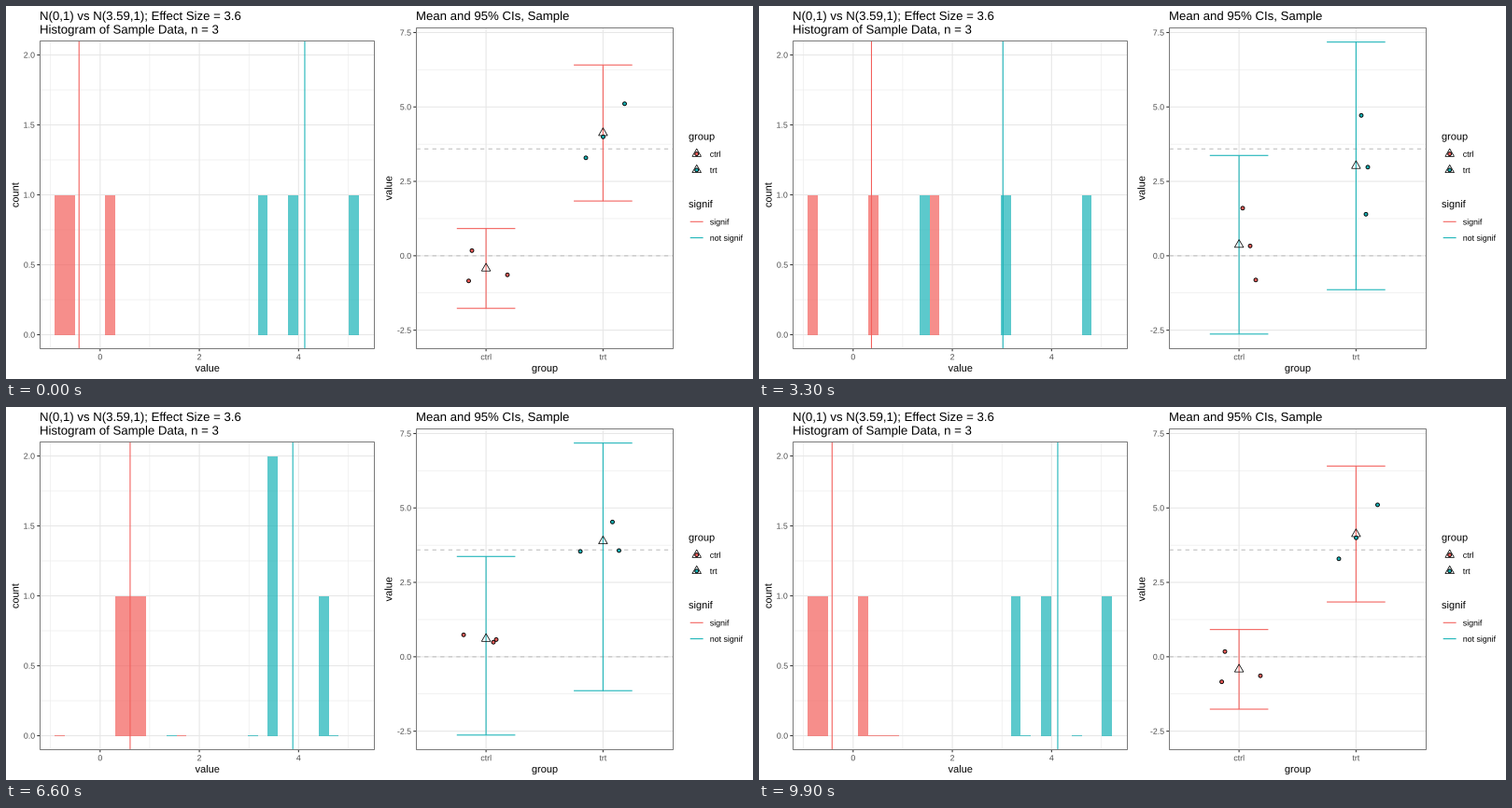
Write a matplotlib script that moves like this. It is 800x400 px and loops after 10 s.

```python
import math

import matplotlib.pyplot as plt
from matplotlib.animation import FuncAnimation
from matplotlib.patches import Circle, PathPatch, Polygon, Rectangle
from matplotlib.textpath import TextPath
from matplotlib.transforms import Affine2D

PT = 0.72  # points per pixel at 100 dpi
RED, TEAL = "#F35E5A", "#17B3B7"
COLORS = (RED, TEAL)
GRID = "#E7E7E7"
LW = 1.07

# left, top, right, bottom of each panel in pixels
HIST = (36.5, 37.5, 394.5, 367.5)
CIS = (439.5, 23.5, 714.5, 367.5)
BIN0, BIN_W = 52.1, 10.871
GROUP_X = (514.1, 639.4)

# one entry per state: bin counts, means and CI half widths for ctrl and trt
COUNTS = (
    ({0: 1, 1: 1, 5: 1}, {20: 1, 23: 1, 29: 1}),
    ({0: 1, 6: 1, 12: 1}, {11: 1, 19: 1, 27: 1}),
    ({6: 1, 7: 1, 8: 1}, {21: 2, 26: 1}),
)
MEANS = ((-0.425, 4.125), (0.37, 3.02), (0.605, 3.885))
HALVES = ((1.34, 2.285), (3.0, 4.16), (0.317, 1.4))
CI_COLORS = (RED, TEAL, RED)

# sample points (pixels): each row is one point through the three states
POINTS = (
    (((499, 262), (526, 257), (490, 244)),
     ((537, 288), (518, 216.5), (522, 252)),
     ((495.5, 294.5), (532, 293.5), (525, 249))),
    (((621, 162.5), (652, 172.5), (615, 154.5)),
     ((662.5, 104.5), (650, 223), (656.5, 153.5)),
     ((639.5, 140), (645, 117), (649.5, 123))),
)
POINT_DY = 0.3

# first and last frame of the three transitions
HIST_MOVES = ((16, 33), (50, 67), (84, 100))
CI_MOVES = ((21, 33), (55, 67), (88, 100))


def hist_x(v):
    return 100.8 + 53.13 * v


def hist_y(v):
    return 352.5 - 150 * v


def ci_y(v):
    return 267.85 - 31.92 * v


def ease(p):
    return 4 * p ** 3 if p < 0.5 else 1 - 4 * (1 - p) ** 3


def phase(frame, moves):
    """Current state, next state and eased progress between them."""
    for i, (start, end) in enumerate(moves):
        if frame < end:
            p = max(0, frame - start) / (end - start)
            return i, (i + 1) % 3, ease(p)
    return 0, 0, 0


def mix(a, b, t):
    return a + (b - a) * t


fig = plt.figure(figsize=(8, 4), dpi=100, facecolor="white")
ax = fig.add_axes([0, 0, 1, 1])
ax.set_xlim(0, 800)
ax.set_ylim(400, 0)
ax.axis("off")


def line(xs, ys, color, width=LW, z=1, **kw):
    kw.setdefault("solid_capstyle", "butt")
    return ax.plot(xs, ys, color=color, lw=width * PT, zorder=z, snap=False,
                   **kw)[0]


def text(x, y, s, size, color="black", align=0, rotation=0):
    """Outline text on a baseline; align is 0 left, 0.5 centre, 1 right."""
    prop = {"family": "Liberation Sans"}
    path = TextPath((0, 0), s, size=size, prop=prop)
    # the trailing bar makes the extent independent of side bearings
    box = path.get_extents()
    move = Affine2D().translate(-align * (box.x0 + box.x1), 0)
    move = move.rotate_deg(rotation).scale(1, -1).translate(x, y)
    ax.add_patch(PathPatch(move.transform_path(path), fc=color, lw=0,
                           snap=False, zorder=9))


def triangle(x, y):
    return [(x, y - 5.53), (x + 4.79, y + 2.77), (x - 4.79, y + 2.77)]


def add_triangle(x, y):
    return ax.add_patch(Polygon(triangle(x, y), closed=True, fill=False,
                                ec="black", lw=0.75 * PT, zorder=5))


def add_point(x, y, color):
    return ax.add_patch(Circle((x, y), 1.95, fc=color, ec="black",
                               lw=0.9 * PT, zorder=6))


def panel(box, x_major, x_minor, y_major, y_minor, x_name, y_name, name_x):
    x0, y0, x1, y1 = box
    for values, width in ((x_minor, LW / 2), (x_major, LW)):
        for x in values:
            line([x, x], [y0, y1], GRID, width)
    for values, width in ((y_minor, LW / 2), (y_major, LW)):
        for y in values:
            line([x0, x1], [y, y], GRID, width)
    for x, label in x_major.items():
        line([x, x], [y1, y1 + 2.75], "#333333")
        text(x, 379.3, label, 8.8, "#4D4D4D", 0.5)
    for y, label in y_major.items():
        line([x0 - 3.2, x0], [y, y], "#333333")
        text(x0 - 5.4, y + 3.1, label, 8.8, "#4D4D4D", 1)
    ax.add_patch(Rectangle((x0, y0), x1 - x0, y1 - y0, fill=False,
                           ec="#7A7A7A", lw=PT, zorder=8, snap=False))
    text((x0 + x1) / 2, 391.9, x_name, 11, align=0.5)
    text(name_x, (y0 + y1) / 2, y_name, 11, align=0.5, rotation=90)


panel(HIST,
      {hist_x(v): str(v) for v in (0, 2, 4)},
      [hist_x(v) for v in (-1, 1, 3, 5)],
      {hist_y(k / 2): f"{k / 2:.1f}" for k in range(5)},
      [hist_y(k / 2 + 0.25) for k in range(4)],
      "value", "count", 13.5)
panel(CIS,
      dict(zip(GROUP_X, ("ctrl", "trt"))), [],
      {ci_y(2.5 * k): f"{2.5 * k:.1f}" for k in range(-1, 4)},
      [ci_y(2.5 * k + 1.25) for k in range(-1, 3)],
      "group", "value", 413.3)

text(36, 15, "N(0,1) vs N(3.59,1); Effect Size = 3.6", 13.2)
text(36, 29.6, "Histogram of Sample Data, n = 3", 13.2)
text(439, 15, "Mean and 95% CIs, Sample", 13.2)

for v in (0, 3.59):
    line([CIS[0], CIS[2]], [ci_y(v)] * 2, "#BEBEBE", z=2,
         ls=(0, (4, 4)), dash_capstyle="butt")

# legends
text(731, 143.5, "group", 11)
text(731, 216, "signif", 11)
for i, color in enumerate(COLORS):
    y = 158.6 + 17.28 * i
    add_triangle(739.7, y)
    add_point(739.7, y, color)
    text(753.8, y + 3.2, ("ctrl", "trt")[i], 8.8)
    y = 231.3 + 17.28 * i
    line([732.7, 746.6], [y, y], color)
    text(753.8, y + 3.2, ("signif", "not signif")[i], 8.8)

# moving parts
bars = [[], []]
mean_lines, whiskers, triangles, dots = [], [], [], []
for g, color in enumerate(COLORS):
    for k in range(30):
        left, right = (round(BIN0 + BIN_W * j) for j in (k, k + 1))
        bars[g].append(ax.add_patch(Rectangle(
            (left, 353), right - left, 0, fc=color, alpha=0.7, lw=0, zorder=2)))
    mean_lines.append(line([0, 0], [HIST[1], HIST[3]], color, z=3))
    whiskers.append([line([0, 0], [0, 0], RED, z=4) for _ in range(3)])
    triangles.append(add_triangle(0, 0))
    dots.append([add_point(0, 0, color) for _ in range(3)])


def draw_hist(frame):
    a, b, t = phase(frame, HIST_MOVES)
    for g in range(2):
        for k, bar in enumerate(bars[g]):
            h = mix(COUNTS[a][g].get(k, 0), COUNTS[b][g].get(k, 0), t)
            # whole pixel rows, so the lowest bars still show as a thin strip
            top = math.floor(hist_y(h) + 0.5)
            bar.set_visible(h > 0)
            bar.set_y(top)
            bar.set_height(353 - top)
        x = hist_x(mix(MEANS[a][g], MEANS[b][g], t))
        mean_lines[g].set_xdata([x, x])


def draw_cis(frame):
    a, b, t = phase(frame, CI_MOVES)
    # intervals only glide between states of equal significance
    same = CI_COLORS[a] == CI_COLORS[b]
    for g, x in enumerate(GROUP_X):
        mean = mix(MEANS[a][g], MEANS[b][g], t)
        triangles[g].set_xy(triangle(x, ci_y(mean)))
        if same:
            mid, half = mean, mix(HALVES[a][g], HALVES[b][g], t)
        else:
            mid, half = MEANS[a][g], HALVES[a][g]
        lo, hi = ci_y(mid - half), ci_y(mid + half)
        ends = (((x, x), (lo, hi)),
                ((x - 31.3, x + 31.3), (lo, lo)),
                ((x - 31.3, x + 31.3), (hi, hi)))
        for part, (xs, ys) in zip(whiskers[g], ends):
            part.set_data(xs, ys)
            part.set_color(CI_COLORS[a])
        for dot, path in zip(dots[g], POINTS[g]):
            px, py = (mix(p, q, t) for p, q in zip(path[a], path[b]))
            dot.center = px, py + POINT_DY


def update(frame):
    draw_hist(frame)
    draw_cis(frame)
    return []


def reset():
    return update(0)


anim = FuncAnimation(fig, update, frames=100, init_func=reset, interval=100,
                     repeat=True, repeat_delay=0, blit=False)
plt.show()
```
